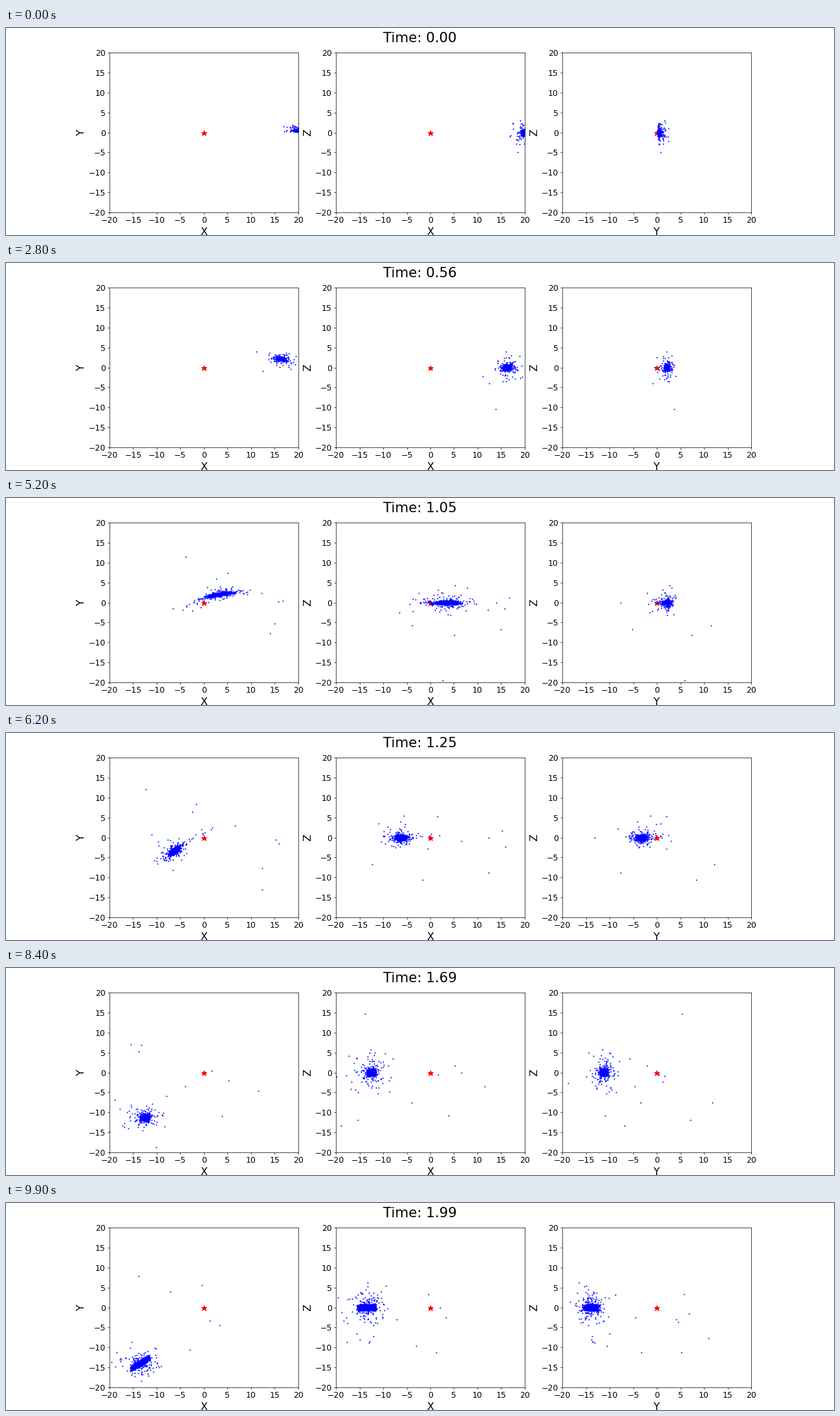
Animation of 1280x320 px, one loop 10000 ms. Source, as a matplotlib script:

```python
import numpy as np
import matplotlib.pyplot as plt
from matplotlib.animation import FuncAnimation

FRAMES, INTERVAL = 100, 100
STEP = 0.020145               # simulated time per frame
CORE, HALO, EJECTED = 600, 200, 18
N = CORE + HALO
GM, SOFTENING = 9000, 2.7     # pull of the star
DT, T_END = 0.001, 2.4

rng = np.random.default_rng(4)


def fly():
    """Paths of the cluster centre (row 0) and of the bodies it throws out."""
    launch = np.append(0, rng.uniform(0.05, 1.35, EJECTED))
    kick = rng.normal(0, 18, (EJECTED + 1, 3))
    kick[0] = 0
    pos = np.tile([20.0, 0.2, 0.0], (EJECTED + 1, 1))
    vel = np.tile([0.0, 3.85, 0.0], (EJECTED + 1, 1)) + kick
    times = np.arange(0, T_END, DT)
    path = np.empty((len(times), EJECTED + 1, 3))
    for k, t in enumerate(times):
        path[k] = pos
        waiting = launch > t
        pos[waiting] = pos[0]
        vel[waiting] = vel[0] + kick[waiting]
        r2 = (pos**2).sum(axis=1, keepdims=True)
        vel -= DT * GM * pos / (r2 + SOFTENING**2) ** 1.5
        pos += DT * vel
    return times, path


times, path = fly()

# Each member circles inside the cluster and runs a little ahead or behind.
cos_part = rng.normal(size=(N, 3))
sin_part = rng.normal(size=(N, 3))
rate = rng.uniform(2, 6, (N, 1)) * rng.choice([-1, 1], (N, 1))
reach = np.exp(rng.normal(0, 0.5, (HALO, 1)))
core_lead = rng.normal(0, 0.025, CORE)
halo_lead = np.clip(0.03 * rng.standard_t(2, HALO), -0.3, 0.15)


def positions(t):
    passing = np.exp(-((t - 1.02) / 0.25) ** 2)
    after = 1 / (1 + np.exp((1.25 - t) / 0.08))
    grow = np.clip((t - 1.45) / 0.54, 0, 1)

    d = cos_part * np.cos(rate * t) + sin_part * np.sin(rate * t)
    core, halo = d[:CORE], d[CORE:]
    core[:] = 1.6 * np.tanh(core / 1.6)
    core *= [0.45 + 0.95 * grow**2,
             0.2 + 0.22 * after + 0.12 * grow,
             0.48 - 0.18 * passing + 0.15 * after - 0.1 * grow]
    core[:, 1] += 0.7 * grow**2 * core[:, 0]
    halo *= (0.7 - 0.1 * passing + 0.15 * after + 0.65 * grow) * reach
    halo *= [0.85, 0.65, 1.1]

    # All members start on the upper side and spread from there.
    fold = max(0, 1 - t / 0.3)
    d[:, 1] += fold * (np.abs(d[:, 1]) - d[:, 1])

    lead = np.append(core_lead * (0.4 + 0.6 * passing), halo_lead)
    when = t + lead * min(1, t / 0.5)
    for axis in (0, 1):
        d[:, axis] += np.interp(when, times, path[:, 0, axis])
    return np.vstack([d, path[int(round(t / DT)), 1:]])


fig, axes = plt.subplots(1, 3, figsize=(20, 5), dpi=64)
title = fig.suptitle("Time: 0.00", fontsize=24)
PLANES = [(0, 1), (0, 2), (1, 2)]
ticks = np.arange(-20, 21, 5)
dots = []
for ax, (i, j) in zip(axes, PLANES):
    ax.plot(0, 0, "*", color="red", markersize=10)
    dots += ax.plot([], [], "o", color="blue", markersize=1.2)
    ax.set(xlim=(-20, 20), ylim=(-20, 20), xticks=ticks, yticks=ticks)
    ax.tick_params(labelsize=14)
    ax.set_xlabel("XYZ"[i], fontsize=18)
    ax.set_ylabel("XYZ"[j], fontsize=18)


def update(frame):
    t = frame * STEP
    p = positions(t)
    for dot, (i, j) in zip(dots, PLANES):
        dot.set_data(p[:, i], p[:, j])
    title.set_text(f"Time: {t:.2f}")
    return dots + [title]


anim = FuncAnimation(fig, update, frames=FRAMES, interval=INTERVAL,
                     init_func=lambda: update(0), repeat=True)
plt.show()
```
